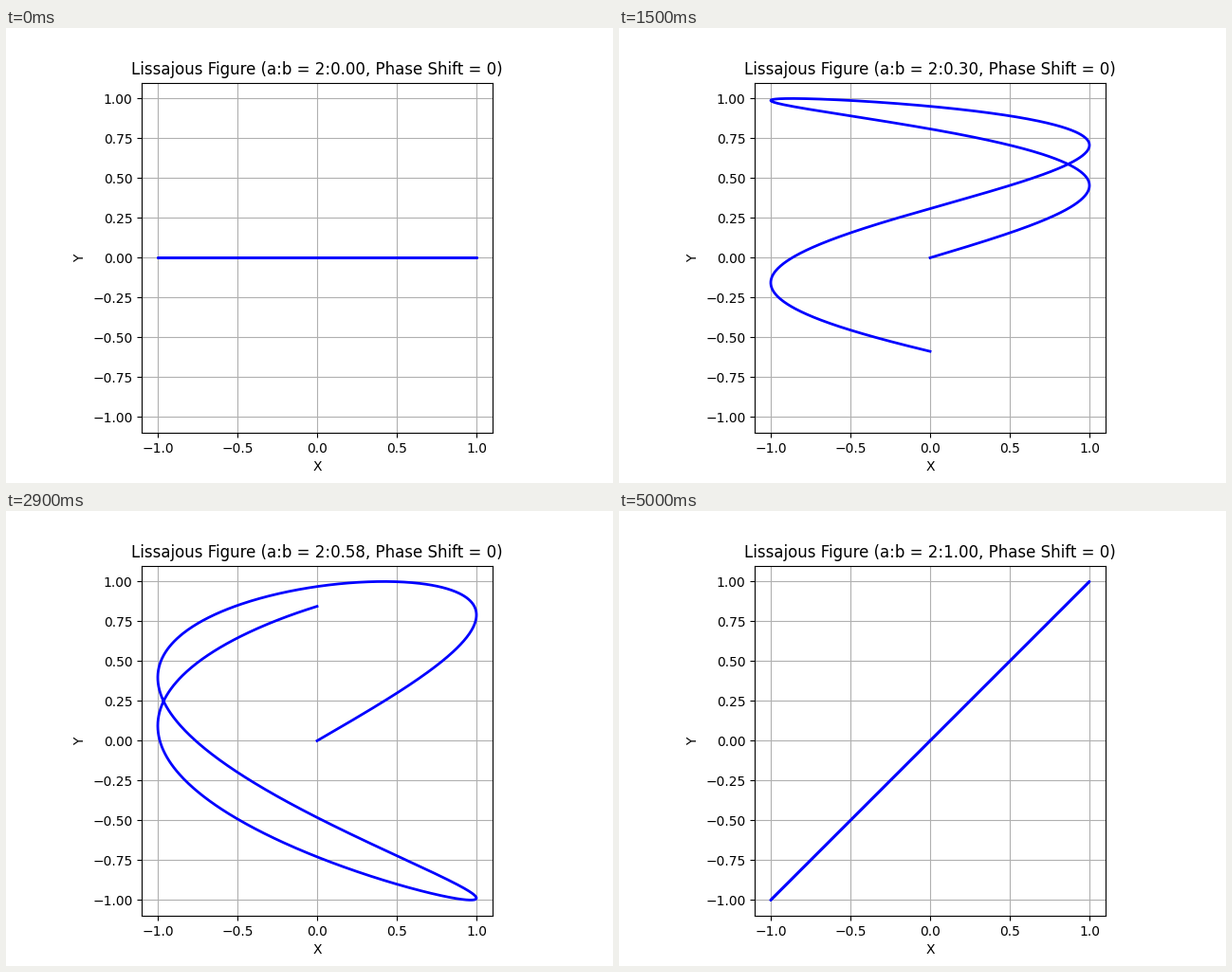
Recreate the animation shown at these times as a matplotlib script. Size 640 by 480 pixels, loop 5050 ms.

```python
import numpy as np
import matplotlib.pyplot as plt
from matplotlib.animation import FuncAnimation

FRAMES = 101
INTERVAL = 50
A = 2

fig, ax = plt.subplots(figsize=(6.4, 4.8), dpi=100)
ax.set_xlim(-1.1, 1.1)
ax.set_ylim(-1.1, 1.1)
ax.set_xticks(np.arange(-1, 1.01, 0.5))
ax.set_yticks(np.arange(-1, 1.01, 0.25))
ax.set_aspect("equal")
ax.set_xlabel("X")
ax.set_ylabel("Y")
ax.grid(True)

t = np.linspace(0, 2 * np.pi, 1000)
line, = ax.plot([], [], color="blue", lw=2)
title = ax.set_title("")


def update(i):
    ratio = i / (FRAMES - 1)
    line.set_data(np.sin(A * t), np.sin(A * ratio * t))
    title.set_text(f"Lissajous Figure (a:b = {A}:{ratio:.2f}, Phase Shift = 0)")
    return line, title


def init():
    return update(0)


anim = FuncAnimation(fig, update, frames=FRAMES, init_func=init,
                     interval=INTERVAL, repeat=True, repeat_delay=0, blit=False)
plt.show()
```
